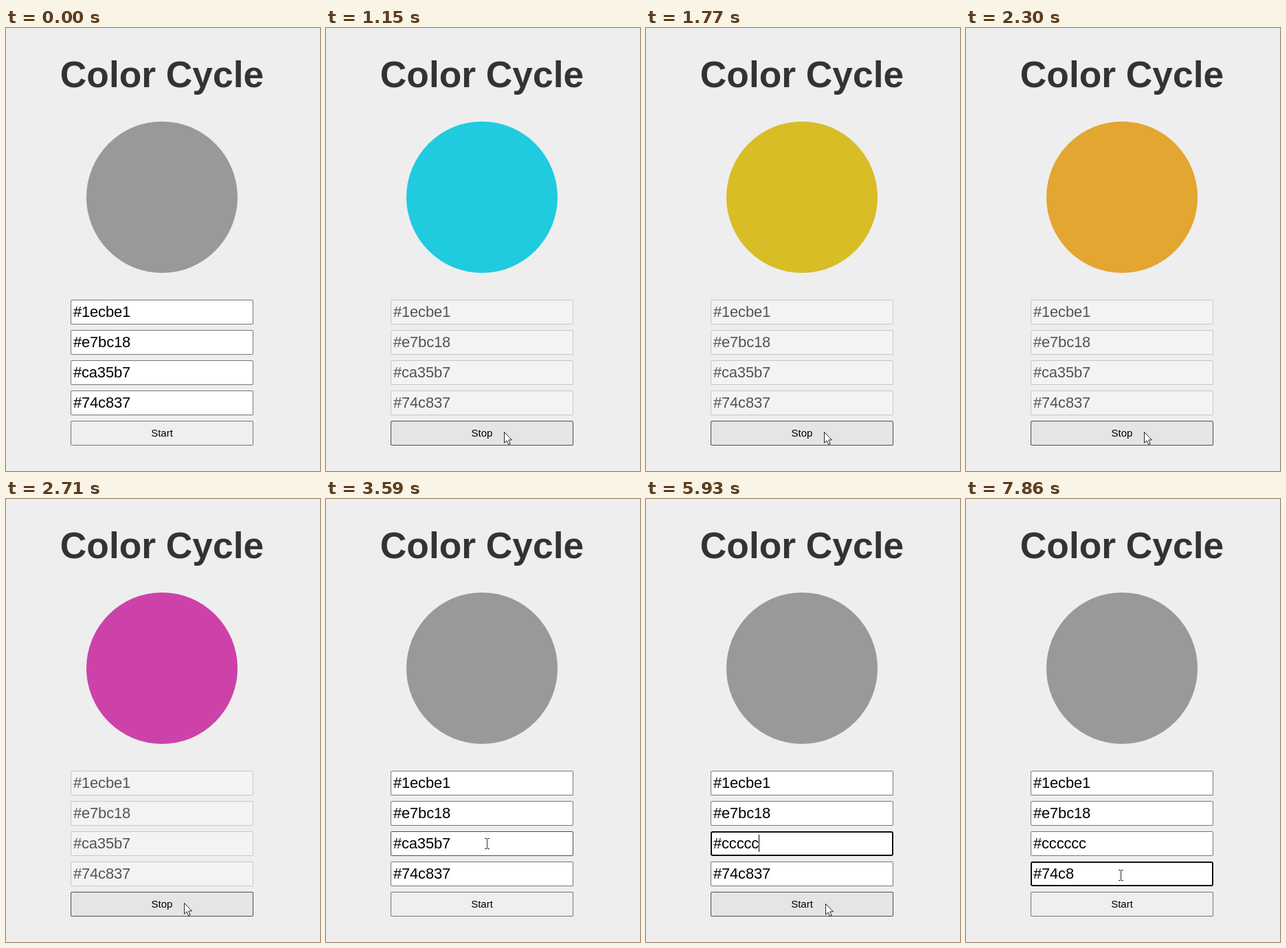
Animation of 457x644 px, one loop 8000 ms. Source, as an HTML page:

```html
<!DOCTYPE html>
<html lang="en">
<head>
<meta charset="utf-8">
<title>Color Cycle</title>
<style>
  html, body { margin: 0; width: 100%; height: 100%; overflow: hidden; background: #eee; }
  body { position: relative; font-family: "Liberation Sans", Arial, sans-serif; }
  h1 {
    position: absolute; left: 0; top: 38px; width: 454px; margin: 0;
    font-size: 53.33px; line-height: 60px; text-align: center; color: #333;
  }
  #disc {
    position: absolute; left: 117px; top: 136px; width: 220px; height: 220px;
    border-radius: 50%; animation-name: cycle;
  }
  .box {
    --line: #767676;
    position: absolute; left: 94px; box-sizing: border-box; width: 266px; height: 36px;
    line-height: 36px; border-radius: 2px; box-shadow: inset 0 0 0 1px var(--line);
    white-space: pre; color: #000;
  }
  .field { padding-left: 4px; background: #fff; font-size: 22px; letter-spacing: -.2px; }
  .hover { --line: #4f4f4f; }
  .off { --line: #c6c6c6; background: #f3f3f3; color: #545454; }
  .focus { border-radius: 3px; box-shadow: inset 0 0 0 2px #101010; }
  .caret::after { content: ""; position: absolute; top: 5px; width: 1px; height: 25px; background: #000; }
  #a { top: 395px; }
  #b { top: 439px; }
  #c { top: 483px; }
  #d { top: 527px; }
  #btn { top: 571px; background: #efefef; font-size: 15px; text-align: center; }
  #btn.hover { background: #e4e5e5; }
  #btn.down { --line: #8d8d8d; background: #f5f5f5; }
  #cursor { position: absolute; left: 0; top: 0; overflow: visible; animation-name: roam; }
  #cursor > * { visibility: hidden; }
  #cursor > .on { visibility: visible; }

  /* Both timelines are scrubbed through --t. */
  #disc, #cursor {
    animation-duration: 8s; animation-play-state: paused; animation-fill-mode: both;
    animation-timing-function: ease; animation-delay: calc(var(--t, 0) * -1ms);
  }
  @keyframes cycle {
    0%, 14.08% { background: #999; }
    14.09% { background: #1ecbe1; }
    26.21% { background: #e7bc18; }
    38.34%, 40.74% { background: #ca35b7; }
    40.75%, 100% { background: #999; }
  }
  @keyframes roam {
    0%, 3.75% { transform: translate(358px, 634px); }
    9.6%, 41.7% { transform: translate(259px, 587px); }
    44.8%, 74.1% { transform: translate(234px, 501px); }
    74.12%, 75.2% { transform: translate(261px, 588px); }
    78%, 82.7% { transform: translate(240px, 549px); }
    86%, 88% { transform: translate(228px, 507px); }
    91.3%, 100% { transform: translate(225px, 547px); }
  }
</style>
</head>
<body>
<h1>Color Cycle</h1>
<div id="disc"></div>
<div class="box field" id="a">#1ecbe1</div>
<div class="box field" id="b">#e7bc18</div>
<div class="box field" id="c"></div>
<div class="box field" id="d"></div>
<div class="box" id="btn"></div>
<svg id="cursor" width="1" height="1">
  <path id="arrow" d="M.5 .5V16.2L4.1 12.9L6.6 18.6L9.2 17.5L6.7 11.9H11.6Z" fill="#fff" stroke="#222"/>
  <path id="beam" d="M-3 -7.5H0M1 -7.5H4M-3 7.5H0M1 7.5H4M.5 -7V7" fill="none" stroke="#333"/>
</svg>
<script>
  const LOOP = 8000;
  const $ = id => document.getElementById(id);
  const fields = ['a', 'b', 'c', 'd'];

  // Repaint times: single moments, or runs of [first, last, count].
  const beats = [0, [300, 770, 7], [1000, 1610, 9], 1770, 2070, [2230, 2550, 5], 2710,
    [3260, 3590, 5], [3810, 4050, 4], 4350, 4600, [4750, 4980, 4], 5130, 5300, 5470, 5700,
    [5930, 6240, 5], 6390, [6620, 7310, 10], 7690, 7860
  ].flatMap(b => Array.isArray(b) ? run(...b) : b);

  const cues = [
    [0, { c: '#ca35b7', d: '#74c837' }],
    [300, { cursor: 'arrow' }],
    [530, { hover: 'btn' }],
    [1000, { down: true }],
    [1150, { down: false, on: true }],
    [3260, { on: false }],
    [3420, { hover: 'd', cursor: 'beam' }],
    [3500, { hover: 'c' }],
    [3810, { focus: 'c', caret: true }],
    [4050, { cursor: '', hover: '' }],
    [4350, { caret: false }],
    [4600, { c: '#ca35b' }],
    [4750, { c: '#ca35' }],
    [4820, { c: '#ca3' }],
    [4900, { c: '#ca' }],
    [4980, { caret: true }],
    [5130, { c: '#c' }],
    [5300, { c: '#cc' }],
    [5470, { c: '#ccc' }],
    [5700, { c: '#cccc' }],
    [5930, { c: '#ccccc', cursor: 'arrow', hover: 'btn' }],
    [6000, { c: '#cccccc' }],
    [6160, { cursor: 'beam', hover: 'd' }],
    [6390, { focus: 'd' }],
    [6770, { hover: 'c' }],
    [7150, { hover: 'd' }],
    [7690, { d: '#74c83', caret: false }],
    [7860, { d: '#74c8' }]
  ];

  function run(first, last, count) {
    const gap = (last - first) / (count - 1);
    return Array.from({ length: count }, (_, i) => Math.floor((first + i * gap) / 10) * 10);
  }

  function draw(t) {
    const s = Object.assign({}, ...cues.filter(cue => cue[0] <= t).map(cue => cue[1]));
    const flag = (id, name, on) => $(id).classList.toggle(name, !!on);

    document.body.style.setProperty('--t', t);
    $('c').textContent = s.c;
    $('d').textContent = s.d;
    $('btn').textContent = s.on ? 'Stop' : 'Start';
    for (const id of fields) {
      flag(id, 'off', s.on);
      flag(id, 'focus', s.focus === id);
      flag(id, 'caret', s.focus === id && s.caret);
    }
    for (const id of [...fields, 'btn']) flag(id, 'hover', s.hover === id);
    for (const id of ['arrow', 'beam']) flag(id, 'on', s.cursor === id);
    flag('btn', 'down', s.down);
  }

  const start = performance.now();
  let shown = -1;
  function tick() {
    const t = (performance.now() - start) % LOOP;
    const beat = beats.filter(b => b <= t).pop();
    if (beat !== shown) draw(shown = beat);
    requestAnimationFrame(tick);
  }
  tick();
</script>
</body>
</html>
```
